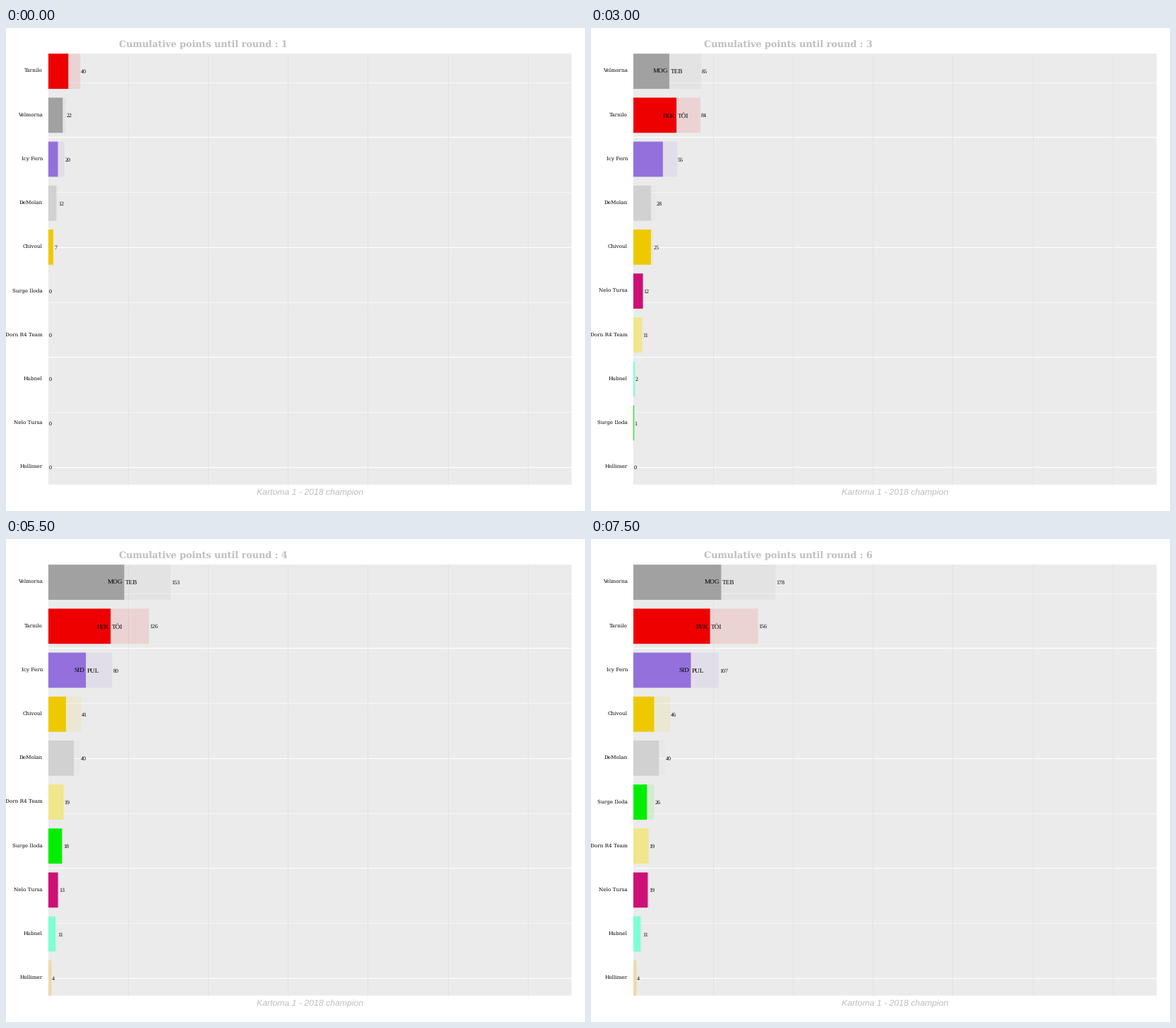
A matplotlib script that plays this animation: 820x683 px, repeating every 8 s.

```python
import matplotlib.pyplot as plt
from matplotlib.animation import FuncAnimation
from matplotlib.patches import Rectangle

W, H, DPI = 820, 683, 64  # a power of two keeps the pixel size exact
LEFT, RIGHT, TOP, BOTTOM = 60, 801, 36.3, 645.6
ROW = (BOTTOM - TOP) / 9.8
UNIT = 1.131  # pixels per point
BAR = 0.8 * ROW
CODE_MINIMUM = 70

# name, colour, driver codes, (leading driver, team total) after each round
TEAMS = [
    ("Tarnilo", "#ee0000", ("FEK", "TÖI"),
     [(25, 40), (50, 65), (54, 84), (66, 114), (78, 126), (96, 156)]),
    ("Surge Iloda", "#00ee00", None,
     [(0, 0), (1, 1), (1, 1), (15, 16), (17, 18), (17, 26)]),
    ("Dorn R4 Team", "#f0e68c", None,
     [(0, 0), (10, 10), (11, 11), (11, 11), (19, 19), (19, 19)]),
    ("DeMolan", "#d1d1d1", None,
     [(10, 12), (16, 22), (22, 28), (28, 36), (32, 40), (32, 40)]),
    ("Velmorna", "#a1a1a1", ("MOG", "TEB"),
     [(18, 22), (33, 55), (45, 85), (70, 110), (95, 153), (110, 178)]),
    ("Icy Fern", "#9370db", ("SID", "PUL"),
     [(12, 20), (12, 20), (37, 55), (37, 55), (47, 80), (72, 107)]),
    ("Chivoul", "#eec900", None,
     [(6, 7), (14, 15), (22, 25), (22, 35), (22, 41), (26, 46)]),
    ("Hubnel", "#7fffd4", None,
     [(0, 0), (2, 2), (2, 2), (8, 10), (9, 11), (9, 11)]),
    ("Nelo Tursa", "#cd1076", None,
     [(0, 0), (12, 12), (12, 12), (12, 13), (12, 13), (18, 19)]),
    ("Hollimer", "#eed8ae", None,
     [(0, 0), (0, 0), (0, 0), (4, 4), (4, 4), (4, 4)]),
]
ROUNDS = 6

plt.rcParams["text.hinting"] = "none"
fig = plt.figure(figsize=(W / DPI, H / DPI), dpi=DPI, facecolor="white")
ax = fig.add_axes([0, 0, 1, 1])
ax.set(xlim=(0, W), ylim=(H, 0))
ax.axis("off")


def row_y(rank):
    """Centre of a row; ranks start at 1."""
    return TOP + BAR / 2 + (rank - 1) * ROW


def box(x, y, w, h, color, z, alpha=1):
    return ax.add_patch(Rectangle((x, y), w, h, fc=color, lw=0, alpha=alpha,
                                  zorder=z, snap=False))


def label(x, y, text, px, font, ha="left", **style):
    return ax.text(x, y, text, fontsize=px * 72 / DPI, family=font, ha=ha,
                   va="baseline", zorder=5, **style)


def grid_line(xs, ys, px, color):
    ax.plot(xs, ys, lw=px * 72 / DPI, color=color, zorder=1,
            solid_capstyle="butt")


def draw_panel():
    box(LEFT, TOP, RIGHT - LEFT, BOTTOM - TOP, "#ebebeb", 0)
    for k in range(1, 9):
        y = row_y(1.25 * k)
        major = k % 2 == 0
        grid_line([LEFT, RIGHT], [y, y], 1.2 if major else 0.6, "white")
    for k in range(1, 7):
        x = LEFT + 100 * k * UNIT
        grid_line([x, x], [TOP, BOTTOM], 1, "#e2e2e2")
    label((LEFT + RIGHT) / 2, 661, "Kartoma 1 - 2018 champion", 12.2,
          "Liberation Sans", "center", style="italic", color="#bebebe")


def draw_standings(stage):
    artists = []
    ranking = sorted(TEAMS, key=lambda team: -team[3][stage][1])
    for rank, (name, color, codes, points) in enumerate(ranking, 1):
        lead, total = points[stage]
        y = row_y(rank)
        split, end = LEFT + lead * UNIT, LEFT + total * UNIT
        artists += [
            box(LEFT, y - BAR / 2, split - LEFT, BAR, color, 2),
            box(split, y - BAR / 2, end - split, BAR, color, 2, 0.1),
            label(52, y + 1.2, name, 7.2, "DejaVu Serif", "right"),
            label(end + 0.4 * len(str(total)), y + 3, str(total), 8,
                  "Liberation Serif"),
        ]
        if codes and total > CODE_MINIMUM:
            for code, x, ha in zip(codes, (split - 2, split + 1.7),
                                   ("right", "left")):
                artists.append(label(x, y + 3.2, code, 9.2,
                                     "Liberation Serif", ha))
    return artists


draw_panel()
standings = [draw_standings(stage) for stage in range(ROUNDS)]
title = label(159.5, 27, "", 12.8, "DejaVu Serif", weight="bold",
              color="#bebebe")


def update(i):
    # The bars jump one step ahead of the title.
    current = (i + 1) // 3
    for stage, artists in enumerate(standings):
        for artist in artists:
            artist.set_visible(stage == current)
    title.set_text(f"Cumulative points until round : {i // 3 + 1}")
    return []


anim = FuncAnimation(fig, update, frames=16, interval=500, repeat=True,
                     repeat_delay=0, blit=False)
plt.show()
```
